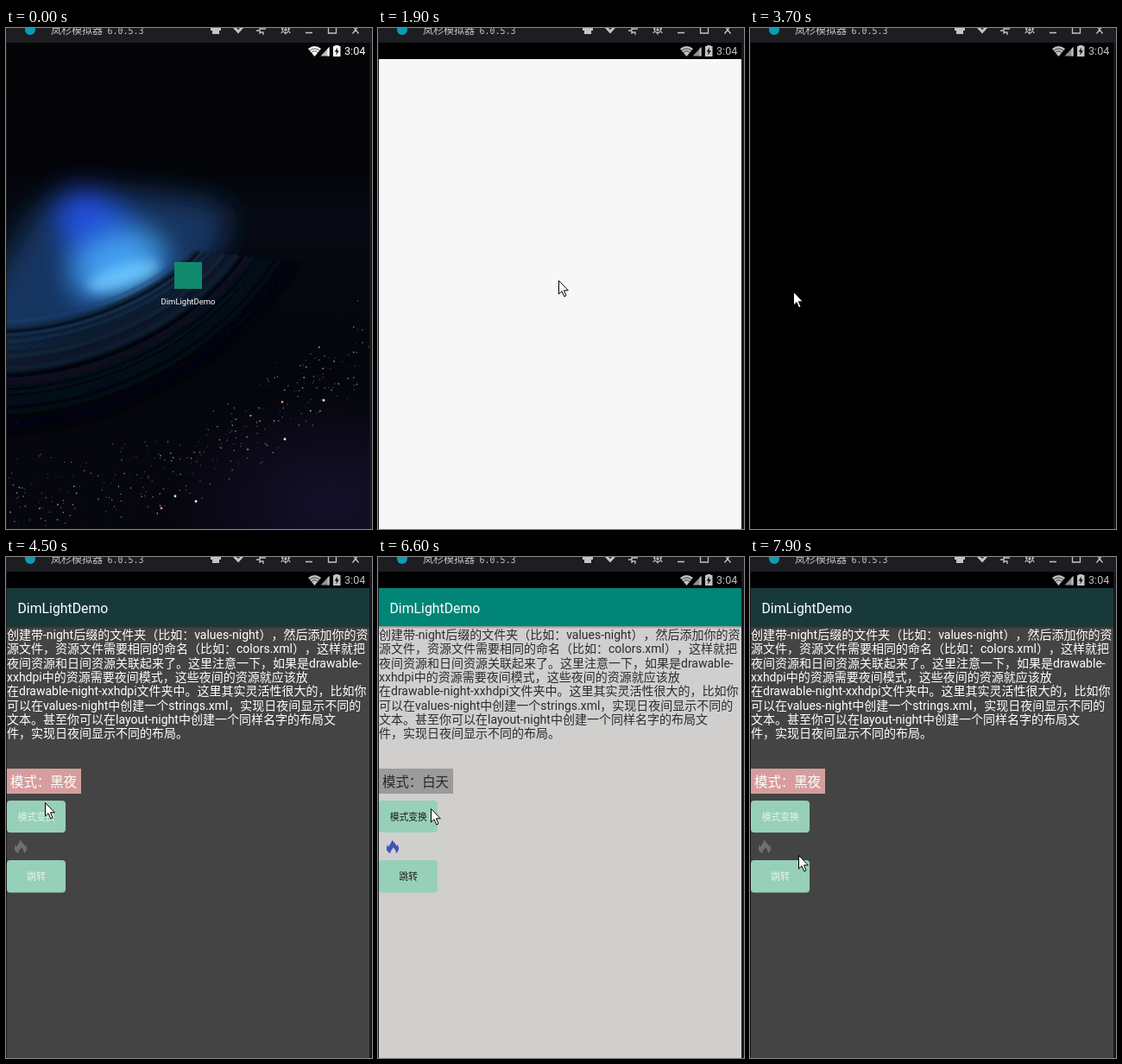
Recreate the animation shown at these times as an HTML page. Size 424 px wide and 580 px high, loop 8 s.

```html
<!DOCTYPE html>
<html lang="zh">
<head>
<meta charset="utf-8">
<title>Theme switch</title>
<style>
  html, body { margin: 0; width: 100%; height: 100%; overflow: hidden; background: #17181c; }
  svg { display: block; width: 424px; height: 580px; }
  text { font-family: Roboto, "Noto Sans CJK SC", "Noto Sans CJK", sans-serif; white-space: pre; text-spacing-trim: space-all; }
  .mid { font-family: "Noto Sans CJK TC", "Noto Sans CJK", sans-serif; }
  #app { --bar: #008577; --page: #d0cfce; --ink: #2c2c2c; --tag: #9d9b9a; --tagInk: #262626; --btnInk: #1c1c1c; --flame: #3f51b5; }
  #app.night { --bar: #17393a; --page: #444; --ink: #fff; --tag: #d69d9d; --tagInk: #fff; --btnInk: #e6f4ed; --flame: #707070; }
</style>
</head>
<body>
<svg viewBox="0 0 424 580">
  <defs>
    <clipPath id="screen"><rect x="1" y="17" width="420" height="563"/></clipPath>
    <linearGradient id="sky" x1="0" y1="0" x2="0" y2="1">
      <stop offset="0" stop-color="#050507"/>
      <stop offset=".25" stop-color="#030408"/>
      <stop offset=".36" stop-color="#060a13"/>
      <stop offset=".62" stop-color="#04060c"/>
      <stop offset="1" stop-color="#06060f"/>
    </linearGradient>
    <radialGradient id="dusk">
      <stop offset="0" stop-color="#15102a"/>
      <stop offset="1" stop-color="#15102a" stop-opacity="0"/>
    </radialGradient>
    <linearGradient id="shade" x1="0" y1="0" x2="0" y2="1">
      <stop offset="0" stop-opacity=".35"/>
      <stop offset="1" stop-opacity="0"/>
    </linearGradient>
    <filter id="fine" x="-20%" y="-20%" width="140%" height="140%"><feGaussianBlur stdDeviation="1.3"/></filter>
    <filter id="soft" x="-60%" y="-100%" width="220%" height="300%"><feGaussianBlur stdDeviation="7"/></filter>
    <filter id="haze" x="-80%" y="-80%" width="260%" height="260%"><feGaussianBlur stdDeviation="16"/></filter>
  </defs>

  <rect width="424" height="580" fill="#17181c"/>

  <g clip-path="url(#screen)">
    <g id="home">
      <rect y="17" width="424" height="563" fill="url(#sky)"/>
      <ellipse cx="380" cy="550" rx="190" ry="130" fill="url(#dusk)"/>
      <g filter="url(#haze)">
        <path d="M40 205 Q130 175 250 205 Q270 235 225 285 Q120 350 -30 395 L-30 310Z" fill="#143660"/>
        <path d="M62 193 L112 190 L190 275 L85 315Z" fill="#2058cc"/>
        <ellipse cx="88" cy="213" rx="24" ry="27" fill="#2350e0"/>
        <ellipse cx="130" cy="272" rx="50" ry="30" fill="#45a2f2" transform="rotate(-18 130 272)"/>
      </g>
      <ellipse cx="136" cy="287" rx="44" ry="12" fill="#74ccff" opacity=".8" filter="url(#soft)" transform="rotate(-18 136 287)"/>
      <g id="arms" fill="none" filter="url(#fine)"></g>
      <g id="stars"></g>
      <rect x="195" y="271" width="32" height="31" fill="#11896d"/>
      <text x="211" y="320" font-size="9.5" fill="#fff" text-anchor="middle">DimLightDemo</text>
    </g>

    <rect id="black" y="17" width="424" height="563"/>
    <rect id="strip" y="17" width="424" height="19"/>

    <g id="app">
      <rect y="36" width="424" height="544" style="fill:var(--page)"/>
      <rect y="36" width="424" height="44" style="fill:var(--bar)"/>
      <rect y="80" width="424" height="3" fill="url(#shade)"/>
      <text x="13.5" y="65" font-size="15.8" fill="#fff">DimLightDemo</text>
      <g id="lines" font-size="14" style="fill:var(--ink)"></g>
      <rect x="1" y="245" width="86" height="29" style="fill:var(--tag)"/>
      <text x="5" y="265.5" font-size="15.4" style="fill:var(--tagInk)">模式<tspan class="mid">：</tspan><tspan id="mode">白天</tspan></text>
      <g fill="#97d0b8">
        <rect x="1" y="282" width="68" height="37" rx="4"/>
        <rect x="1" y="351" width="68" height="37.5" rx="4"/>
      </g>
      <g font-size="10.8" text-anchor="middle" style="fill:var(--btnInk)">
        <text x="35.3" y="304.5">模式变换</text>
        <text x="35.3" y="374">跳转</text>
      </g>
      <path style="fill:var(--flame)" d="M16.5 327 C17 330 21 331.5 21.500 335 Q22.5 334.5 22.3 332.5 C25 336.5 24.5 341 20.5 343 C21.5 340.5 20 338.5 17.5 336 C17.3 338.5 14 339.5 14.5 343 C9.5 341.5 8.8 336.5 11.5 333 Q11.7 335.5 13 335.5 C12.8 332 16.5 331 16.5 327Z"/>
    </g>

    <rect id="blank" x="1" y="36" width="420" height="544" fill="#f7f7f7"/>

    <g id="status" fill="#fff">
      <path d="M350 24 Q357.5 18 365 24 L357.5 33Z"/>
      <path d="M351.5 26.3 Q357.5 21.5 363.5 26.3 M353.5 28.5 Q357.5 25 361.5 28.5" fill="none" stroke="#000" stroke-width=".7"/>
      <path d="M364.5 32.5 L374.5 22 V32.5Z" opacity=".75"/>
      <path d="M372.5 24 L374.5 22 V32.5 H372.5Z"/>
      <path d="M381 21 V20 H385.5 V21 H387.5 V33 H379 V21Z"/>
      <path d="M384 22.5 L380.8 27.6 H382.9 L382.3 31.5 L385.8 26.3 H383.6Z" fill="#000"/>
      <text x="392" y="31.3" font-size="12.6">3:04</text>
    </g>
  </g>

  <rect width="424" height="17" fill="#1d1e22"/>
  <circle cx="28" cy="2" r="6" fill="#0a9db8"/>
  <g fill="#c4c4c6">
    <text x="52" y="6.5" font-size="12">岚杉模拟器</text>
    <text x="117.5" y="6.5" font-size="10" style="font-family:'DejaVu Sans Mono',monospace">6.0.5.3</text>
    <path d="M237 0 H249 V3 H247 V7 H239 V3 H237Z"/>
    <path d="M263 0 L269 6.5 L275 0 L272 -1 L269 2 L266 -1Z"/>
  </g>
  <g fill="none" stroke="#c4c4c6" stroke-width="1.3">
    <path d="M290 3 H294 M294 0 V7 M294 1 H301 M294 5 H298 V8"/>
    <circle cx="324" cy="2" r="3.5"/>
    <path d="M324 5 V7.5 M320 4 L318.8 6 M328 4 L329.2 6 M319 1 H320.5 M327.5 1 H329"/>
    <circle cx="324" cy="2" r="1"/>
    <path d="M347 5.5 H355 M373.5 -1 V6 H382.5 V-1 M401.5 6.5 L405 2 L408.5 6.5 M405 2 L402.5 -1 M405 2 L407.5 -1"/>
  </g>

  <path id="cursor" d="M.5 .5 V16 L4 12.7 L6.7 18.8 L9 17.8 L6.4 11.8 H11.3Z" fill="#fff" stroke="#000" stroke-linejoin="round"/>
</svg>

<script>
const LOOP = 8000, STEP = 100;
const $ = id => document.getElementById(id);

const make = (parent, tag, attrs, text = '') => {
  const el = document.createElementNS(parent.namespaceURI, tag);
  for (const k in attrs) el.setAttribute(k, attrs[k]);
  el.textContent = text;
  parent.append(el);
  return el;
};

let seed = 7;
const rnd = () => (seed = seed * 16807 % 2147483647) / 2147483647;

const copy = `创建带-night后缀的文件夹（比如：values-night），然后添加你的资
源文件，资源文件需要相同的命名（比如：colors.xml），这样就把
夜间资源和日间资源关联起来了。这里注意一下，如果是drawable-
xxhdpi中的资源需要夜间模式，这些夜间的资源就应该放
在drawable-night-xxhdpi文件夹中。这里其实灵活性很大的，比如你
可以在values-night中创建一个strings.xml，实现日夜间显示不同的
文本。甚至你可以在layout-night中创建一个同样名字的布局文
件，实现日夜间显示不同的布局。`;

// Commas and colons sit in the middle of their cell
copy.split('\n').forEach((s, i) => {
  const line = make($('lines'), 'text', { x: 1, y: 95 + i * 16.3 });
  for (const part of s.split(/([，：])/))
    make(line, 'tspan', /^[，：]$/.test(part) ? { class: 'mid' } : {}, part);
});

// Fine streaks sweeping below the glow, fading outwards
for (let i = 0; i < 75; i++) {
  const d = i * 1.7 + rnd() * 8, fade = 1 - i / 75;
  const light = 3 + rnd() * 26 * fade;
  make($('arms'), 'path', {
    d: `M-20 ${340 + d} C${70 + d * .3} ${342 + d} ${165 + d * .7} ${305 + d * .8} ${212 + d} ${258 + d * .1}`,
    stroke: `hsl(${208 + rnd() * 16} 52% ${light}%)`,
    'stroke-width': 1 + rnd() * 5,
    opacity: .3 + fade * .4
  });
}

// Star belt curving up to the right
for (let i = 0; i < 360; i++) {
  const x = rnd() * 420;
  const y = 548 - 190 * (x / 420) ** 2 + (rnd() + rnd() - 1) * 60;
  make($('stars'), 'circle', {
    cx: x, cy: y, r: .4 + rnd() * .5,
    fill: ['#8fa6d0', '#c4cde0', '#c79a90'][i % 3], opacity: .25 + rnd() * .7
  });
}
[[320, 433, '#f08070'], [368, 431, '#fff'], [323, 476, '#f3e6dd'], [180, 556, '#f09080'], [220, 548, '#fff'], [196, 542, '#dce4ff']]
  .forEach(([cx, cy, fill]) => make($('stars'), 'circle', { cx, cy, r: 1.4, fill }));

// Cursor: time, x, y
const path = [
  [100, 402, 94], [900, 218, 291], [1200, 209, 292], [2700, 209, 292], [3100, 51, 305],
  [3200, 51, 305], [3300, 50, 305], [4300, 50, 305], [4500, 45, 284], [4600, 45, 284],
  [4800, 27, 288], [6100, 27, 288], [6400, 49, 293], [6600, 61, 291], [7600, 61, 291], [7900, 56, 345]
];

const cursorAt = t => {
  const i = path.findIndex(k => k[0] >= t);
  if (i < 1) return path[0].slice(1);
  const [t0, x0, y0] = path[i - 1], [t1, x1, y1] = path[i];
  const p = (t - t0) / (t1 - t0), e = p * (2 - p);
  return [x0 + (x1 - x0) * e, y0 + (y1 - y0) * e].map(Math.round);
};

const within = (t, a, b) => t >= a && t < b;
const show = (id, on) => $(id).style.display = on ? '' : 'none';

function draw(t) {
  const black = within(t, 3700, 3800) || within(t, 5500, 5700) || within(t, 7100, 7300);
  const night = within(t, 3800, 5500) || t >= 7300;

  show('home', t < 1900);
  show('black', black);
  show('strip', t >= 1700);
  show('app', t >= 2100 && !black);
  $('app').setAttribute('class', night ? 'night' : '');
  $('mode').textContent = night ? '黑夜' : '白天';

  // Launch window grows in, then fades to the content
  show('blank', within(t, 1700, 2200));
  const grow = Math.min(1, (t - 1600) / 300), s = .8 + .2 * grow * (2 - grow);
  $('blank').setAttribute('transform', `translate(211 308) scale(${s}) translate(-211 -308)`);
  $('blank').setAttribute('opacity', t >= 2100 ? .5 : Math.max(0, grow));

  $('status').setAttribute('opacity', t < 1700 ? 1 : .76);
  show('cursor', t >= 100);
  $('cursor').setAttribute('transform', `translate(${cursorAt(t)})`);
}

const start = performance.now();
function tick() {
  const t = (performance.now() - start) % LOOP;
  draw(Math.floor(t / STEP) * STEP);
  requestAnimationFrame(tick);
}
tick();
</script>
</body>
</html>
```
